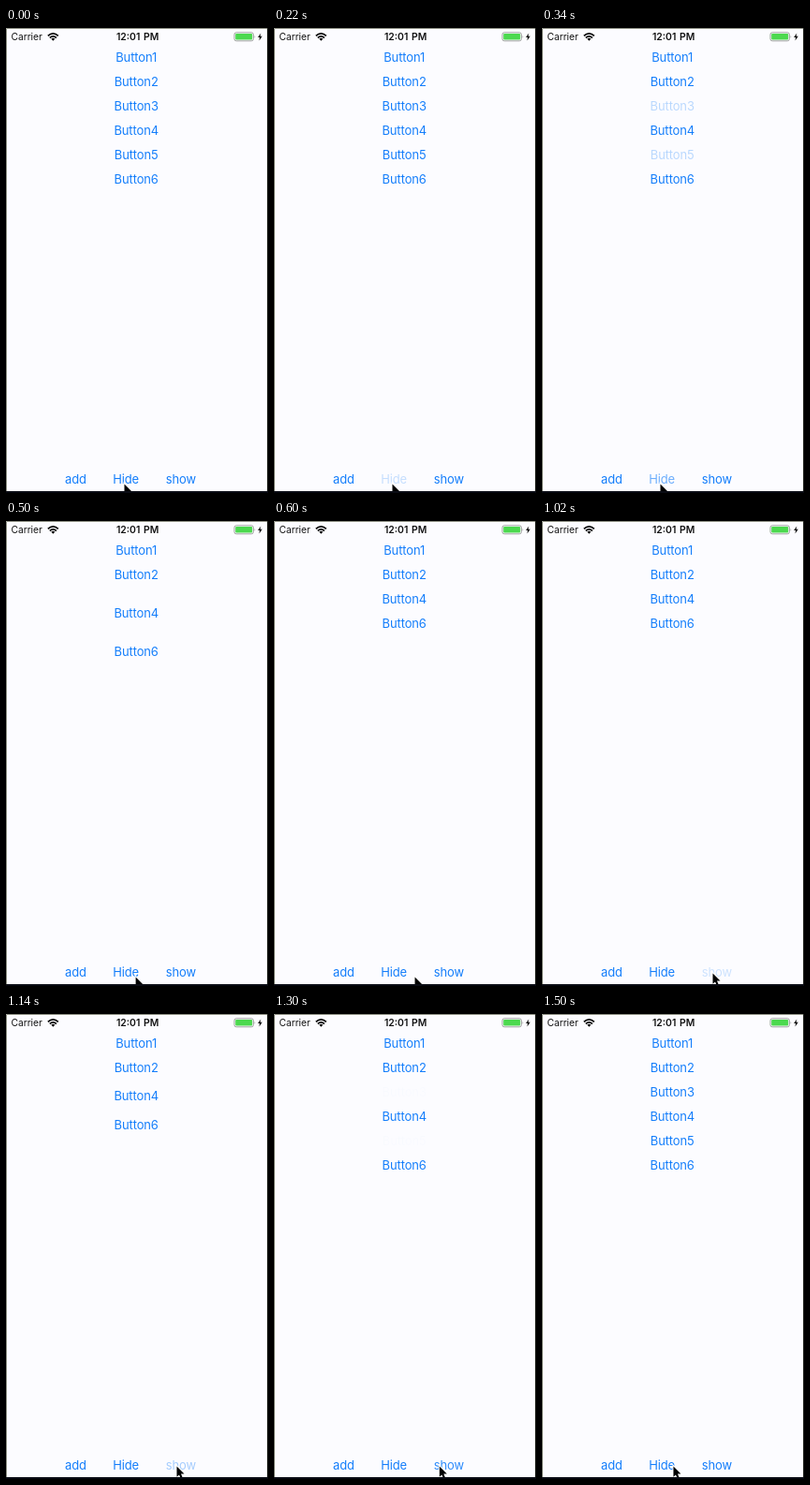
Animation, 280 px wide and 496 px high, one loop 1.52 s. Source, as an HTML page:

```html
<!DOCTYPE html>
<html lang="en">
<head>
<meta charset="utf-8">
<title>Stack view buttons</title>
<style>
  html, body { margin: 0; height: 100%; overflow: hidden; background: #fcfcff; }
  svg { display: block; width: 280px; height: 496px; font-family: Inter, Roboto, sans-serif; }
  .button { font-size: 13px; letter-spacing: -.13px; fill: #147efb; text-anchor: middle; }
  .status { font-size: 10.2px; fill: #111; }
  .clock { font-size: 10.4px; font-weight: 600; word-spacing: 1px; text-anchor: middle; }
</style>
</head>
<body>
<svg viewBox="0 0 280 496">
  <rect width="280" height="496" fill="#fcfcff"/>

  <g class="status">
    <text x="5.5" y="13.2">Carrier</text>
    <text class="clock" x="140.6" y="13.2">12:01 PM</text>
  </g>
  <g fill="none" stroke="#000" stroke-width="1.7">
    <path d="M44.8 8.3Q50.3 3.3 55.8 8.3"/>
    <path d="M46.8 10.5Q50.3 7.3 53.8 10.5"/>
  </g>
  <path d="M48.3 11.6Q50.3 10 52.3 11.6L50.3 13.7Z"/>

  <rect x="244" y="4.8" width="20.4" height="9" rx="2.2" fill="none" stroke="#8a8d8a" stroke-width=".8"/>
  <rect x="245.2" y="6" width="18" height="6.6" rx="1" fill="#4cd94f"/>
  <path d="M265.6 7.8Q267 9.4 265.6 11Z" fill="#8a8d8a"/>
  <path d="M272.3 5.4L269.2 9.9H271.2L270.5 13.4L273.8 8.7H271.6Z"/>

  <g id="buttons" class="button"></g>
  <g class="button">
    <text x="74.4" y="486">add</text>
    <text id="hide" x="128.1" y="486">Hide</text>
    <text id="show" x="186.9" y="486">show</text>
  </g>

  <path d="M.5 496V.5H280" fill="none" stroke="#8d9084"/>
  <path d="M279.5 0V496" stroke="#2a2c28"/>
  <path id="cursor" d="M0 0V11.2L2.5 8.9L4.2 12.8L6.2 12L4.5 8.1H8Z" stroke="#fff" stroke-width="2" paint-order="stroke"/>
  <rect y="494" width="280" height="2" fill="#0a0c14"/>
</svg>
<script>
  const LOOP = 1520, STEP = 200, ROW = 26;
  const HIDE_AT = 211, SHOW_AT = 1088;
  const $ = id => document.getElementById(id);

  const clamp = v => Math.min(1, Math.max(0, v));
  const ease = (t, start) => {
    const p = clamp((t - start) / STEP);
    return p * p * (3 - 2 * p);
  };

  const buttons = [1, 2, 3, 4, 5, 6].map(n => {
    const text = document.createElementNS('http://www.w3.org/2000/svg', 'text');
    text.textContent = 'Button' + n;
    text.setAttribute('x', 139.2);
    return $('buttons').appendChild(text);
  });

  // Pointer path: time, x, y
  const path = [
    [0, 126.5, 486.5], [400, 126.5, 486.5], [500, 138.5, 486.5], [760, 169.5, 486.5],
    [980, 182.5, 482.5], [1150, 182.5, 482.5], [1300, 177, 482.5], [1520, 137, 482.5]
  ];
  function pointer(t) {
    const i = path.findIndex(k => k[0] > t);
    const [t0, x0, y0] = path[i - 1], [t1, x1, y1] = path[i];
    const p = (t - t0) / (t1 - t0);
    return [x0 + (x1 - x0) * p, y0 + (y1 - y0) * p];
  }

  // Dims on touch down and fades back after release
  const pressed = (t, release) =>
    t < release - 100 ? 1 : .2 + .8 * clamp((t - release) / 250);

  function draw(now) {
    const t = now % LOOP;
    const alpha = 1 - ease(t, HIDE_AT) + ease(t, SHOW_AT + STEP);
    const space = 1 - ease(t, HIDE_AT + STEP) + ease(t, SHOW_AT);

    let y = 35.8;
    buttons.forEach((button, i) => {
      const collapsible = i === 2 || i === 4;
      button.setAttribute('y', y);
      button.setAttribute('opacity', collapsible ? alpha : 1);
      y += collapsible ? ROW * space : ROW;
    });

    $('hide').setAttribute('opacity', pressed(t, HIDE_AT));
    $('show').setAttribute('opacity', pressed(t, SHOW_AT));
    $('cursor').setAttribute('transform', `translate(${pointer(t)})`);
  }

  const start = performance.now();
  function tick() {
    draw(performance.now() - start);
    requestAnimationFrame(tick);
  }
  tick();
</script>
</body>
</html>
```
